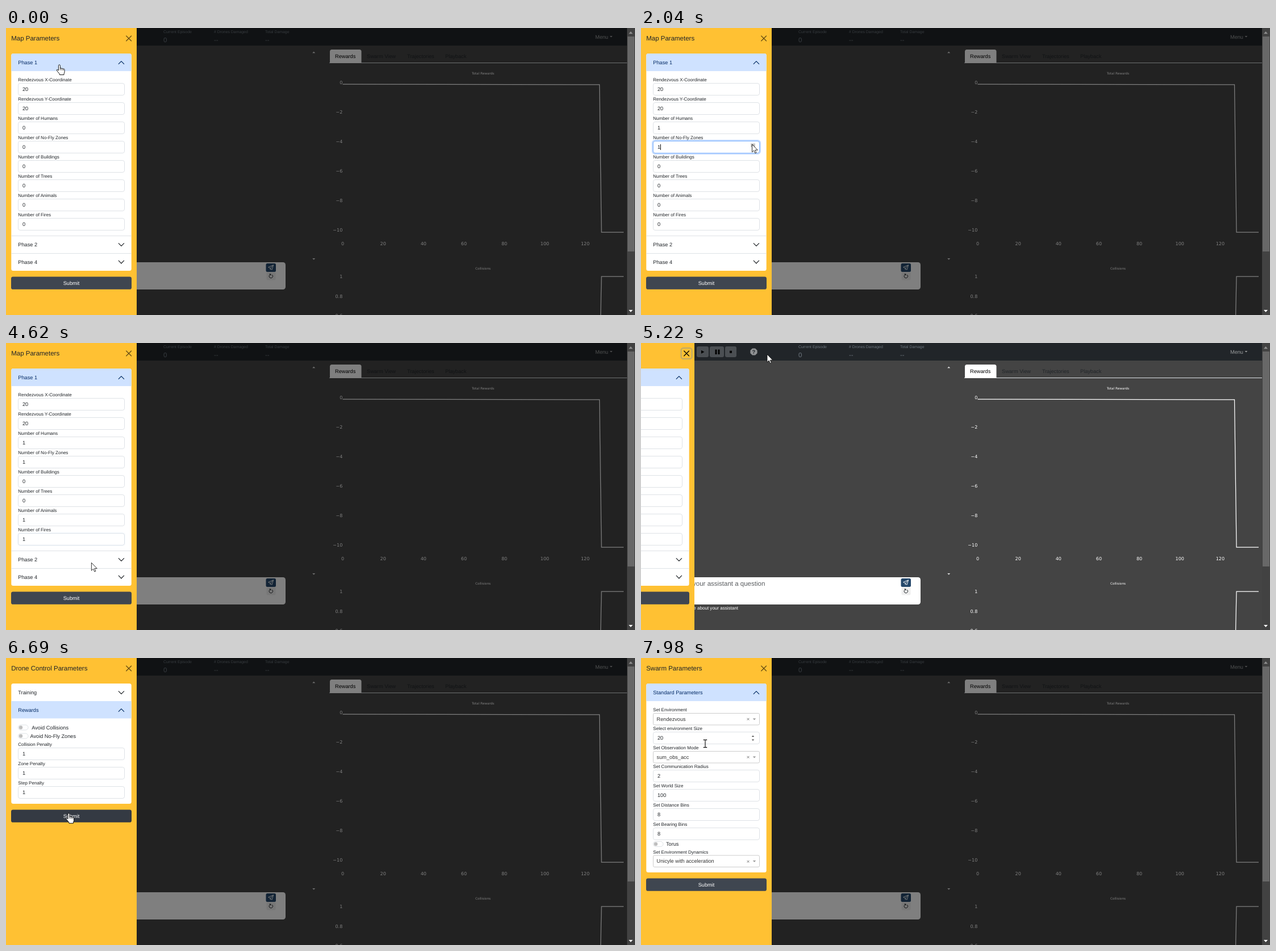
Write an HTML page that moves like this. It is 1107 px wide and 506 px high and loops after 8 s.

```html
<!DOCTYPE html>
<html lang="en">
<head>
<meta charset="utf-8">
<title>Swarm dashboard</title>
<style>
  html, body { margin: 0; width: 100%; height: 100%; overflow: hidden; background: #444; }
  svg { display: block; width: 1107px; height: 506px; }
  text { font-family: "Liberation Sans", Arial, sans-serif; text-rendering: geometricPrecision; white-space: pre; }
  .plot text { font-family: "DejaVu Sans", Verdana, sans-serif; fill: #fff; }
</style>
</head>
<body>
<svg id="stage" viewBox="0 0 1107 506" xmlns="http://www.w3.org/2000/svg"></svg>
<script>
const LOOP = 8000, PANEL_W = 230, INK = '#212529', NAVY = '#052c65', YELLOW = '#ffc133';
const stage = document.getElementById('stage');

// ---------- markup helpers ----------
const text = (x, y, str, size = 9.2, fill = INK, anchor = 'start', extra = '') =>
  `<text x="${x}" y="${(y + size * 0.35).toFixed(2)}" font-size="${size}" fill="${fill}" text-anchor="${anchor}" ${extra}>${str}</text>`;
const rect = (x, y, w, h, fill, r = 0, extra = '') =>
  `<rect x="${x}" y="${y}" width="${w}" height="${h}" rx="${r}" fill="${fill}" ${extra}/>`;
const line = (d, stroke, width = 1, extra = '') =>
  `<path d="${d}" fill="none" stroke="${stroke}" stroke-width="${width}" ${extra}/>`;
const shape = (d, fill, extra = '') => `<path d="${d}" fill="${fill}" ${extra}/>`;
const tri = (x, y, w, h, fill) => shape(`M${x - w / 2} ${y - h / 2}h${w}L${x} ${y + h / 2}Z`, fill);

// ---------- page behind the panels ----------
function navbar() {
  const dim = '#6c757d', key = '#4b4f53';
  const stats = [[277, 'Current Episode', '0'], [366, '# Drones Damaged', '--'], [456, 'Total Damage', '--']];
  return rect(0, 0, 1093, 31, INK) +
    rect(98, 6, 21, 19, key, 3) + shape('M106 12.7L111.5 15.7L106 18.7Z', '#000') +
    rect(121, 6, 25, 19, key, 3) + rect(130.5, 11.5, 3, 8.5, '#000') + rect(135.5, 11.5, 3, 8.5, '#000') +
    rect(148, 6, 20, 19, key, 3) + rect(156, 13.7, 4, 4, '#000') +
    shape('M196 9.5h5l3.6 3.5v5l-3.6 3.5h-5l-3.6-3.5v-5Z', '#8f9193') +
    text(198.5, 15.6, '?', 9.5, INK, 'middle', 'font-weight="bold"') +
    stats.map(([x, label, value]) => text(x, 6.8, label, 6.9, dim) + text(x, 20.5, value, 11.5, dim)).join('') +
    text(1037, 15.3, 'Menu', 9.2, '#9b9d9e') + tri(1065, 15.3, 4.8, 2.6, '#9b9d9e');
}

function plots() {
  let out = text(839.5, 80.3, 'Total Rewards', 5.75, '#fff', 'middle') +
            text(839.5, 424, 'Collisions', 5.75, '#fff', 'middle');
  for (let i = 0; i < 6; i++) out += text(592.3, 96 + i * 52, i ? '−' + i * 2 : '0', 8.05, '#fff', 'end');
  for (let i = 0; i < 7; i++) out += text(592.5 + i * 71.15, 380.3, i * 20, 8.05, '#fff', 'middle');
  ['1', '0.8', '0.6'].forEach((v, i) => out += text(592.3, 438.3 + i * 34.5, v, 8.05, '#fff', 'end'));
  return `<g class="plot">${out}</g>` +
    line('M592.5 99.2L1044.5 99.8L1048 360H1087', '#fff', 1.25) +
    line('M1044.5 610L1048 438H1087', '#fff', 1.25);
}

function page() {
  const tabs = [[635, 'Swarm View'], [706, 'Trajectories'], [773, 'Playback']];
  return rect(0, 0, 1093, 506, '#444') + navbar() +
    line('M569 61.5H1093', '#dee2e6') +
    shape('M570 62V41.5q0-3.5 3.5-3.5h48.5q3.5 0 3.5 3.5V62Z', '#fff') +
    text(579, 49.3, 'Rewards', 9.2, '#000') +
    tabs.map(([x, s]) => text(x, 49.3, s)).join('') +
    plots() +
    shape('M539.2 44.3h5L541.7 41.5Z', '#ddd') + tri(541.7, 407.3, 5, 2.8, '#ddd') +
    rect(62, 413, 430, 48, '#fff', 4.6) +
    text(218.3, 424.3, 'Ask your assistant a question', 11.5, '#595c5f', 'end') +
    rect(457.5, 415, 17.5, 15, '#24476a', 2.5) +
    line('M461.6 421.7L470.6 417.9L468 426.4L465.2 423.7ZM470.6 417.9L465.2 423.7V426.4', '#fff', 0.9, 'stroke-linejoin="round"') +
    rect(458.5, 430.5, 16, 14, '#efefef', 2) +
    line('M464.2 435.2a3.2 3.2 0 1 0 4 -0.2', INK, 1) + shape('M463 433.6h3.4v3.2Z', INK) +
    text(171, 467, 'Learn more about your assistant', 8.05, '#fff', 'end');
}

const scrollbar = () =>
  rect(1093, 0, 14, 506, '#424242') + rect(1094, 15, 12, 379, '#686868') +
  shape('M1096 10.3h7L1099.500 6Z', '#8f8f8f') + tri(1099.5, 499, 7, 4, '#fff');

// ---------- side panels ----------
const chevron = (y, up, color) => {
  const k = up ? -2.4 : 2.4;
  return line(`M198.200 ${y - k}L202.900 ${y + k}L207.600 ${y - k}`, color, 1.2, 'stroke-linecap="round" stroke-linejoin="round"');
};
const label = (y, s) => text(21.3, y, s, 8.05);

function input(y, value, name) {
  const box = (extra) => `<rect x="21.5" y="${y + 0.5}" width="187" height="21" rx="3.4" ${extra}/>`;
  const c = y + 11;
  return `<g data-field="${name}" data-y="${y}">` +
    `<rect class="ring" x="20.1" y="${y - 0.9}" width="189.8" height="23.8" rx="4.6" fill="none" stroke="#0d6efd" stroke-opacity=".25" stroke-width="2.3" opacity="0"/>` +
    box('fill="#fff" stroke="#dee2e6"') + box('class="edge" fill="none" stroke="#86b7fe" opacity="0"') +
    text(29, c, value, 9.2, INK, 'start', 'class="value"') +
    `<path class="caret" d="M34.400 ${c - 5}v10" stroke="#000" stroke-width="1" opacity="0"/>` +
    `<g class="spin" opacity="0"><rect class="hot" x="193" y="${c - 6.5}" width="8" height="6.5" fill="#c9c9c9"/>` +
    shape(`M194.800 ${c - 2}h4.400L197 ${c - 4.6}Z`, '#505050') + tri(197, c + 3.8, 4.4, 2.6, '#505050') + '</g></g>';
}

const dropdown = (y, value) =>
  rect(21.5, y + 0.5, 187, 20.5, '#fff', 2.3, 'stroke="#ccc"') + text(27.6, y + 10.7, value, 9.2, '#333') +
  text(188.5, y + 10.7, '×', 9.6, '#777', 'middle') + tri(199.5, y + 11, 5.4, 3, '#999');

const toggle = (y) =>
  rect(21.5, y - 4.5, 17.5, 9, '#fff', 4.5, 'stroke="#dee2e6"') + `<circle cx="26" cy="${y}" r="3.2" fill="#bfbfbf"/>`;

function header(y, title, open) {
  const color = open ? NAVY : INK;
  const bar = !open ? '' : y === 45
    ? shape('M9.300 76V48.500q0-3.500 3.500-3.500h204.400q3.500 0 3.500 3.500V76Z', '#cfe2ff')
    : rect(9.3, y, 211.4, 30.5, '#cfe2ff');
  return bar + text(21.3, y + 15.8, title, 9.2, color) + chevron(y + 16, open, color);
}

function panel(title, cardEnd, body) {
  return rect(0, 0, PANEL_W, 506, YELLOW) + text(9.2, 18.3, title, 11.5) +
    `<rect class="closeRing" x="206.6" y="8.900" width="19" height="19" rx="4" fill="none" stroke="#0d6efd" stroke-opacity=".25" stroke-width="2.3" opacity="0"/>` +
    line('M211.700 14L220.500 22.800M220.500 14L211.700 22.800', '#000', 1.3, 'class="x" stroke-linecap="round"') +
    rect(9.3, 45, 211.4, cardEnd - 45, '#fff', 3.5) + body +
    rect(9, cardEnd + 10.5, 212, 22.3, '#3f4650', 3.4, 'class="submit"') +
    text(115, cardEnd + 21.5, 'Submit', 9.2, '#fff', 'middle');
}

const mapFields = ['Rendezvous X-Coordinate', 'Rendezvous Y-Coordinate', 'Number of Humans', 'Number of No-Fly Zones',
  'Number of Buildings', 'Number of Trees', 'Number of Animals', 'Number of Fires'];
const mapBody = header(45, 'Phase 1', true) +
  mapFields.map((s, i) => label(91 + i * 34, s) + input(97 + i * 34, i < 2 ? 20 : 0, s.split(' ').pop())).join('') +
  line('M9.300 366.500H220.700M9.300 397.500H220.700', '#dee2e6') +
  header(366, 'Phase 2', false) + header(396.6, 'Phase 4', false);

const controlBody = header(45, 'Training', false) + header(76, 'Rewards', true) +
  toggle(122.5) + toggle(137.5) +
  text(110, 122.5, 'Avoid Collisions', 9.2, INK, 'end') + text(123, 137.5, 'Avoid No-Fly Zones', 9.2, INK, 'end') +
  ['Collision Penalty', 'Zone Penalty', 'Step Penalty'].map((s, i) => label(152 + i * 34, s) + input(158 + i * 34, 1, s)).join('');

const swarmBody = header(45, 'Standard Parameters', true) +
  label(91, 'Set Environment') + dropdown(97, 'Rendezvous') +
  label(124, 'Select environment Size') + input(130, 20, 'size') +
  label(158, 'Set Observation Mode') + dropdown(164, 'sum_obs_acc') +
  label(191, 'Set Communication Radius') + input(197, 2, 'radius') +
  label(225, 'Set World Size') + input(231, 100, 'world') +
  label(259, 'Set Distance Bins') + input(265, 8, 'distance') +
  label(293, 'Set Bearing Bins') + input(299, 8, 'bearing') +
  toggle(328) + text(44, 328, 'Torus') +
  label(342, 'Set Environment Dynamics') + dropdown(347.5, 'Unicyle with acceleration');

// open / close: moments the slide begins
const panels = [
  { title: 'Map Parameters', end: 428, body: mapBody, open: -1000, close: 5055 },
  { title: 'Drone Control Parameters', end: 257, body: controlBody, open: 5550, close: 7067 },
  { title: 'Swarm Parameters', end: 378, body: swarmBody, open: 7500, close: 9999 }
];

const cursors = {
  arrow: shape('M0 0V13.800L3.200 10.900L5.400 15.800L7.500 14.900L5.400 10.200H9.800Z', '#fff', 'stroke="#000" stroke-width=".8" stroke-linejoin="round"'),
  hand: shape('M-1.600 10V1.400a1.500 1.500 0 0 1 3 0V6.600a1.400 1.400 0 0 1 2.700 .4a1.400 1.400 0 0 1 2.600 .5a1.300 1.300 0 0 1 2.300 .8V12.500q0 1.500-1 3V17.500H.3V16L-4.200 10.500q-1.400-2 .4-2.200q1 0 2.200 1.700Z',
    '#fff', 'stroke="#000" stroke-width=".9" stroke-linejoin="round"') + line('M1.400 6.500V9.500M4.100 7V9.800M6.700 7.600V10', '#000', 0.7),
  beam: line('M-3.200 -6.600H-.8L0 -6L.8 -6.600H3.200M0 -6V6M-3.200 6.600H-.8L0 6L.8 6.600H3.200', '#000', 1.1)
};

stage.innerHTML = page() + '<rect id="shade" width="1093" height="506"/>' +
  panels.map(p => `<g class="panel">${panel(p.title, p.end, p.body)}</g>`).join('') + scrollbar() +
  '<g id="cursor">' + Object.entries(cursors).map(([k, v]) => `<g data-kind="${k}">${v}</g>`).join('') + '</g>';

// ---------- motion ----------
const clamp = v => Math.max(0, Math.min(1, v));
const smooth = s => s * s * (3 - 2 * s);

// cubic-bezier(.42, 0, .58, 1)
function easeInOut(x) {
  let lo = 0, hi = 1;
  for (let i = 0; i < 18; i++) {
    const s = (lo + hi) / 2, r = 1 - s;
    if (1.26 * s * r * r + 1.74 * s * s * r + s * s * s < x) lo = s; else hi = s;
  }
  return smooth(lo);
}

// time, x, y
const path = [
  [0, 94, 65], [30, 94, 65], [420, 188, 210], [690, 188, 210], [850, 204, 168], [960, 197, 171], [1200, 197, 172],
  [1350, 197, 172], [1600, 202, 221], [1850, 196, 206], [2040, 195.5, 205], [2190, 195.5, 205], [2700, 198, 308],
  [3450, 198, 308], [3680, 203, 338], [3760, 197, 342], [3900, 197, 342], [4230, 160, 432], [4440, 138, 454],
  [4560, 138, 454], [4800, 215, 40], [4990, 214, 17], [5060, 216, 18], [5220, 222, 20], [5500, 45, 15],
  [5560, 42, 16], [5700, 32.5, 152], [5850, 38, 143], [6090, 76, 124], [6360, 76, 124], [6580, 110, 275],
  [6680, 110, 275], [6960, 226, 24], [7050, 217, 18], [7200, 218.5, 19], [7450, 70, 15], [7510, 68, 16],
  [7800, 100, 120], [7950, 111, 141], [7980, 113, 151], [8000, 113, 151]
];

function pointer(t) {
  const i = path.findIndex(p => p[0] > t);
  const [t0, x0, y0] = path[i - 1], [t1, x1, y1] = path[i];
  const s = smooth((t - t0) / (t1 - t0));
  return [x0 + (x1 - x0) * s, y0 + (y1 - y0) * s];
}

// field: clicked at, blurred at
const focus = { Humans: [960, 1890], Zones: [1890, 3165], Animals: [3165, 3745], Fires: [3745, 4480] };

panels.forEach((p, i) => {
  p.el = stage.querySelectorAll('.panel')[i];
  p.get = c => p.el.querySelector('.' + c);
  p.submit = p.get('submit');
  p.ring = p.get('closeRing');
  p.x = p.get('x');
  p.fields = [...p.el.querySelectorAll('[data-field]')].map(g => ({
    y: +g.dataset.y, focus: focus[g.dataset.field],
    ...Object.fromEntries(['ring', 'edge', 'value', 'caret', 'spin', 'hot'].map(c => [c, g.querySelector('.' + c)]))
  }));
});
const shade = document.getElementById('shade'), cursor = document.getElementById('cursor');
const show = (el, v) => el.setAttribute('opacity', +v);

function drawField(f, t, x, y, live) {
  const hover = live && x > 21 && x < 209 && y >= f.y && y < f.y + 22;
  const onSpin = hover && x >= 192 && x < 206;
  show(f.spin, hover);
  show(f.hot, onSpin && y < f.y + 11);
  if (f.focus) {
    const [on, off] = f.focus;
    const glow = clamp((t - on) / 150) - clamp((t - off) / 150);
    show(f.ring, glow);
    show(f.edge, glow);
    show(f.caret, t >= on && t < off && Math.floor(Math.max(0, t - on - 50) / 500) % 2 === 0);
    f.value.textContent = t >= on ? '1' : '0';
  }
  return !hover ? null : onSpin ? 'arrow' : 'beam';
}

function draw(t) {
  const [x, y] = pointer(t);
  let kind = 'arrow', dark = 0;
  for (const p of panels) {
    const slide = easeInOut(clamp((t - p.open) / 300)) - easeInOut(clamp((t - p.close) / 300));
    p.el.setAttribute('transform', `translate(${((slide - 1) * PANEL_W).toFixed(2)} 0)`);
    p.el.setAttribute('visibility', slide > 0.001 ? 'visible' : 'hidden');
    dark += clamp((t - p.open) / 150) - clamp((t - p.close) / 150);

    const live = t > p.open + 465 && t < p.close;
    const onSubmit = live && x > 9 && x < 221 && y > p.end + 10 && y < p.end + 33;
    const onHeader = live && x > 9 && x < 221 && y > 45 && y < (p === panels[1] ? 106 : 76);
    const onClose = live && Math.abs(x - 216) < 10 && Math.abs(y - 18) < 10;
    const closed = t >= p.close;
    p.submit.setAttribute('fill', onSubmit ? '#343a43' : '#3f4650');
    show(p.ring, closed);
    show(p.x, closed ? 1 : onClose ? 0.75 : 0.6);
    if (onSubmit || onHeader || onClose) kind = 'hand';
    for (const f of p.fields) kind = drawField(f, t, x, y, live) || kind;
  }
  show(shade, dark * 0.5);
  cursor.setAttribute('transform', `translate(${x.toFixed(2)} ${y.toFixed(2)})`);
  for (const g of cursor.children) show(g, g.dataset.kind === kind);
}

const start = performance.now();
function tick() {
  draw((performance.now() - start) % LOOP);
  requestAnimationFrame(tick);
}
tick();
</script>
</body>
</html>
```
